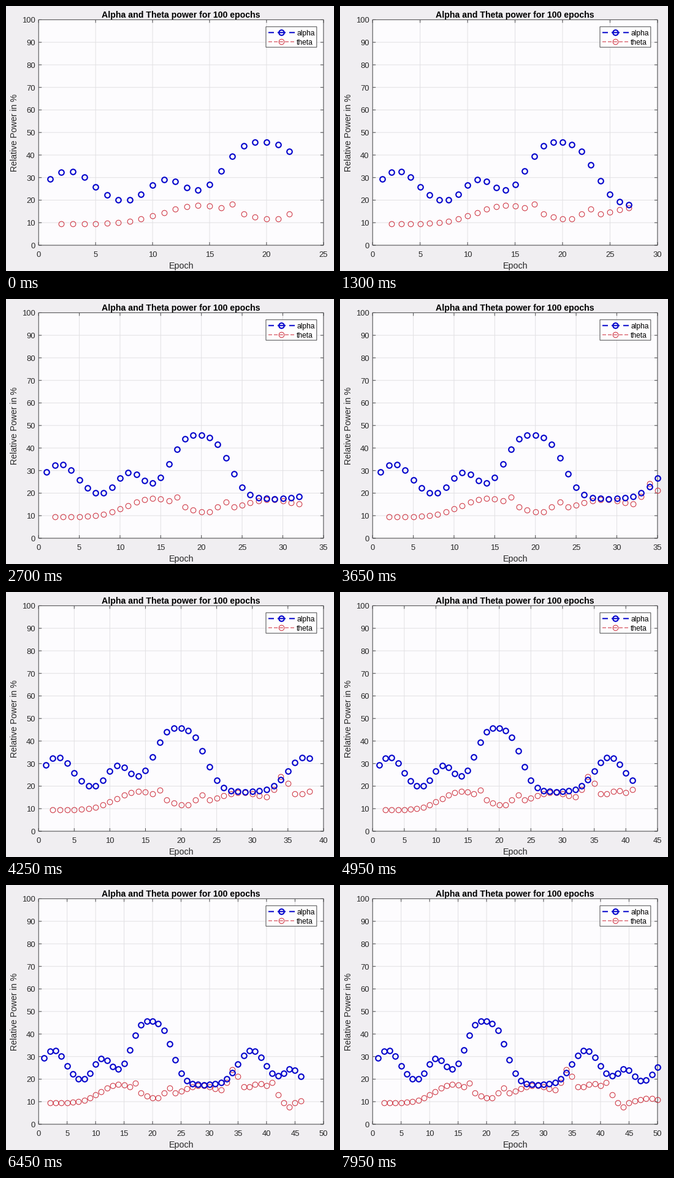
A matplotlib script for the animation above (8000 ms loop, 535 px wide and 432 px high).

```python
import matplotlib.pyplot as plt
import numpy as np
from matplotlib.animation import FuncAnimation
from matplotlib.collections import LineCollection
from matplotlib.patches import Rectangle

W, H, DPI = 535, 432, 100
STEP, LOOP = 50, 8000
LEFT, RIGHT, TOP, BOTTOM = 53.2, 517.9, 22.4, 390
PT = 72 / DPI
BLUE, RED, INK, EDGE, GRID = "#0404cc", "#cc2a38", "#262626", "#4a4a4c", "#e2e1e4"

# each curve is a base level plus bumps of (centre, height, width)
ALPHA = 17.5, [(2.6, 15.4, 3.1), (11.2, 11.5, 2.4), (18.2, 25, 3.1), (22, 18.5, 2.6),
               (37.4, 15.5, 3.3), (44.4, 7, 2), (51.5, 11, 2.6)]
THETA = 9.5, [(14.2, 8.2, 4.5), (17, 3, 0.6), (22.7, 4.2, 0.8), (28.5, 7.6, 5.5),
              (34.2, 11, 1.3), (38.8, 8.3, 3.4), (41, 3.5, 0.6), (43.7, -3, 1),
              (48.5, 2, 2.5)]
PACE = [0, 3600, 4950, 8000], [22.5, 35.4, 41.4, 51.14]

plt.rcParams["font.family"] = "Liberation Sans"
fig = plt.figure(figsize=(W / DPI, H / DPI), dpi=DPI, facecolor="#f0eef1")
ax = fig.add_axes([0, 0, 1, 1])
ax.set_xlim(0, W)
ax.set_ylim(H, 0)
ax.axis("off")


def text(x, y, s, px, ha="center", color=INK, **kw):
    return ax.text(x, y, s, fontsize=px * PT, ha=ha, va="baseline", color=color,
                   rotation_mode="anchor", **kw)


def box(x0, y0, x1, y1, z, **kw):
    ax.add_patch(Rectangle((x0, y0), x1 - x0, y1 - y0, zorder=z, snap=False, **kw))


def lines(segments, color, z, width=1):
    group = LineCollection(segments, colors=color, linewidths=width * PT,
                           zorder=z, snap=False)
    ax.add_collection(group, autolim=False)
    return group


def rings(color, size, width, z, x=(), y=()):
    return ax.plot(x, y, "o", ms=size * PT, mew=width * PT, mec=color,
                   mfc="none", zorder=z)[0]


def to_x(epoch, limit):
    return LEFT + (RIGHT - LEFT) * epoch / limit


def to_y(value):
    return BOTTOM - (BOTTOM - TOP) * value / 100


def power(epochs, curve):
    base, bumps = curve
    return base + sum(h * np.exp(-((epochs - c) / w) ** 2) for c, h, w in bumps)


# plot area
box(LEFT, TOP, RIGHT, BOTTOM, 0, fc="#fdfcfe", ec="none")
box(LEFT, TOP, RIGHT, BOTTOM, 3, fc="none", ec=EDGE, lw=PT)
levels = range(0, 101, 10)
lines([[(LEFT, to_y(v)), (RIGHT, to_y(v))] for v in levels], GRID, 1)
lines([[(x, to_y(v)), (x + d, to_y(v))] for v in levels
       for x, d in ((LEFT, 5), (RIGHT, -5))], EDGE, 3)
for v in levels:
    text(47.5, to_y(v) + 5, str(v), 13, ha="right")
x_grid = lines([], GRID, 1)
x_ticks = lines([], EDGE, 3)
x_labels = [text(0, 409.3, str(5 * i), 13) for i in range(11)]

text(285.5, 18.5, "Alpha and Theta power for 100 epochs", 14.15,
     weight="bold", color="black")
text(286, 428.3, "Epoch", 14.2)
text(18.5, 206.5, "Relative Power in %", 14.1, rotation=90)

theta_dots = rings(RED, 8.7, 1, 4)
alpha_dots = rings(BLUE, 8.6, 2.1, 5)

# legend
box(424, 33.8, 506.8, 67.2, 6, fc="#fefdfe", ec=EDGE, lw=PT)
lines([[(a, 43.3), (b, 43.3)] for a, b in ((428, 437), (443, 456), (462, 471))],
      BLUE, 7, 2)
lines([[(a, 58.3), (a + 6, 58.3)] for a in range(428, 470, 9)], RED, 7)
rings(BLUE, 8.6, 2.1, 8, [449.3], [43.3])
rings(RED, 8.7, 1, 8, [449.3], [58.3])
for y, name in ((48.4, "alpha"), (63.3, "theta")):
    text(474.2, y, name, 12, ha="left", color="black", zorder=8)


def draw(frame):
    n = int(np.interp(frame * STEP, *PACE))
    limit = -(-n // 5) * 5
    # theta starts one epoch late
    for dots, curve, first in ((alpha_dots, ALPHA, 1), (theta_dots, THETA, 2)):
        epochs = np.arange(first, n + 1)
        dots.set_data(to_x(epochs, limit), to_y(power(epochs, curve)))

    xs = [to_x(e, limit) for e in range(0, limit + 1, 5)]
    x_grid.set_segments([[(x, TOP), (x, BOTTOM)] for x in xs])
    x_ticks.set_segments([[(x, y), (x, y + d)] for x in xs
                          for y, d in ((TOP, 5), (BOTTOM, -5))])
    for i, label in enumerate(x_labels):
        label.set_visible(i < len(xs))
        label.set_x(to_x(5 * i, limit))
    return alpha_dots, theta_dots, x_grid, x_ticks, *x_labels


anim = FuncAnimation(fig, draw, frames=LOOP // STEP, interval=STEP,
                     init_func=lambda: draw(0), repeat=True, repeat_delay=0)
plt.show()
```
